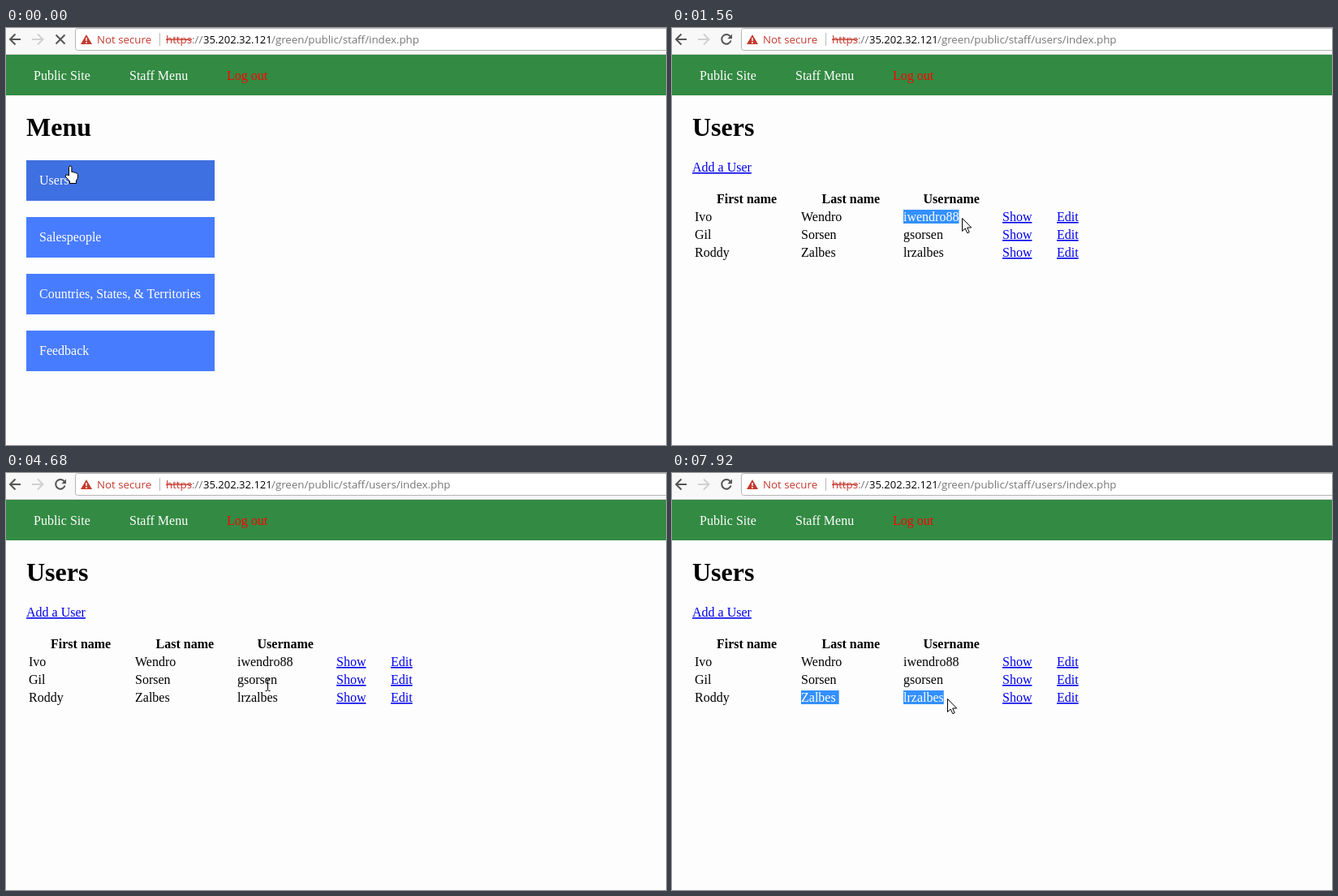
Recreate the animation shown at these times as an HTML page. Size 813 by 514 pixels, loop 8000 ms.

```html
<!DOCTYPE html>
<html lang="en">
<head>
<meta charset="utf-8">
<title>Staff users</title>
<style>
html, body { margin: 0; width: 100%; height: 100%; overflow: hidden; background: #fdfdfd; }
svg { display: block; font: 16px "Liberation Serif", serif; }
text { white-space: pre; }
.bar { font: 13.3px "Open Sans", sans-serif; }
.light { fill: #fff; }
.link { fill: #00e; text-decoration: underline; }
.line { fill: none; stroke: #555; stroke-width: 2; }
.cursor { fill: #fff; stroke: #000; }
.title { font-size: 32px; font-weight: bold; }
.head { font-weight: bold; }
</style>
</head>
<body>
<svg width="813" height="514" viewBox="0 0 813 514">
  <rect width="813" height="32" fill="#f8f8f8"/>
  <rect y="32" width="813" height="1" fill="#d4d4d4"/>
  <path d="M814 27.5H88.5q-3 0-3-3V3.5q0-3 3-3H814" fill="#fff" stroke="#b4b4b4"/>
  <path class="line" d="M18 14H6M11.5 7.5L5 14l6.5 6.5"/>
  <path class="line" d="M32 14H45M39 7.5L45.5 14l-6.5 6.5" style="stroke:#d0d0d0"/>
  <path id="stop" class="line" d="M61.5 8.5l11 11m0-11l-11 11"/>
  <g id="reload">
    <path class="line" d="M71.8 10.5A5.8 5.8 0 1 0 72.6 15.5"/>
    <path d="M74 7.5V13.2h-5.7z" fill="#555"/>
  </g>
  <path d="M99 8l7 12H92z" fill="#c5392d"/>
  <path d="M99 12v4m0 1v2" stroke="#fff" stroke-width="1.5"/>
  <rect x="189" y="6" width="1" height="16" fill="#b8b8b8"/>
  <g class="bar">
    <text x="112" y="19" fill="#c5392d">Not secure</text>
    <text x="197" y="19" fill="#c5392d" text-decoration="line-through">https</text>
    <text x="229" y="19" fill="#777">://</text>
    <text x="243" y="19" font-size="13">35.202.32.121</text>
    <text id="path" x="327" y="19" fill="#777"></text>
  </g>

  <rect y="33" width="813" height="50" fill="#338a43"/>
  <text class="light" x="34" y="64">Public Site</text>
  <text class="light" x="152" y="64">Staff Menu</text>
  <text x="272" y="64" fill="red">Log out</text>

  <g id="menu"><text class="title" x="25" y="133">Menu</text></g>
  <g id="users">
    <text class="title" x="25" y="133">Users</text>
    <text class="link" x="25" y="177">Add a User</text>
    <g class="head">
      <text x="55" y="216">First name</text>
      <text x="184.5" y="216">Last name</text>
      <text x="309.5" y="216">Username</text>
    </g>
  </g>
  <g id="marks"></g>

  <path id="hand" class="cursor" transform="translate(72 169)" d="M5.5 13V2.8a1.7 1.7 0 0 1 3.4 0V8.5q1.7-.8 2.7.6 1.8-.6 2.6.8 2.3-.3 2.3 1.7V16l-2 3V22.5h-8V20L1.2 14q-.3-2.5 2-2z"/>
  <path id="arrow" class="cursor" d="M.5.5V16.5L4.2 13l2.6 5.7 2.4-1L6.7 12h5z"/>
  <path id="beam" class="cursor" style="fill:none" d="M-3-7.5h2l1 1 1-1h2M0-6.5v13M-3 7.5h2l1-1 1 1h2"/>
</svg>
<script>
const LOOP = 8000, OPEN = 150, STEP = 140, LAST_X = 159, USER_X = 285;
const rows = [
  ["Ivo", "Wendro", "iwendro88"],
  ["Gil", "Sorsen", "gsorsen"],
  ["Roddy", "Zalbes", "lrzalbes"]
];
// Pointer moves: start and end time, place reached, row being selected
const moves = [
  [150, 1150, 283, 233],
  [1280, 1560, 357, 234, 0],
  [1700, 1990, 355, 264, 0],
  [2610, 3140, 282, 257],
  [3420, 3700, 346, 257, 1],
  [3840, 3980, 344, 263, 1],
  [4270, 5250, 285, 258],
  [5500, 5920, 350, 261, 1],
  [6200, 7030, 284, 278],
  [7310, 7920, 339, 278, 2]
];

const $ = id => document.getElementById(id);
const show = (id, on) => $(id).style.display = on ? "" : "none";
const baseline = row => 238 + 22 * row;

function add(parent, tag, attrs, content = "") {
  const el = document.createElementNS("http://www.w3.org/2000/svg", tag);
  for (const key in attrs) el.setAttribute(key, attrs[key]);
  el.textContent = content;
  return $(parent).appendChild(el);
}

["Users", "Salespeople", "Countries, States, & Territories", "Feedback"].forEach((label, i) => {
  add("menu", "rect", { x: 25, y: 163 + 70 * i, width: 232, height: 50, fill: i ? "#487cff" : "#3f70e1" });
  add("menu", "text", { x: 41, y: 193 + 70 * i, class: "light" }, label);
});

const userCells = rows.map(([first, last, user], i) => {
  const cell = (x, content, style = "") => add("users", "text", { x, y: baseline(i), class: style }, content);
  cell(28, first);
  cell(LAST_X, last);
  cell(407, "Show", "link");
  cell(474, "Edit", "link");
  return cell(USER_X, user);
});
const userEnds = userCells.map(cell => USER_X + cell.getComputedTextLength());

// The pointer advances in equal jumps during each move and rests between them
function pointer(t) {
  let x = 164, y = 183, row;
  for (const [from, to, endX, endY, marked] of moves) {
    if (t < from) break;
    const jumps = Math.round((to - from) / STEP);
    const done = Math.min(jumps, Math.floor((t - from) / (to - from) * jumps + 0.04));
    const u = (done + 1) / (jumps + 1);
    x += (endX - x) * u;
    y += (endY - y) * u;
    row = marked;
  }
  return { x: Math.round(x), y: Math.round(y), row };
}

function mark(x, row, content) {
  const box = add("marks", "rect", { x, y: baseline(row) - 14, height: 17, fill: "#3390ff" });
  const text = add("marks", "text", { x, y: baseline(row), class: "light" }, content);
  box.setAttribute("width", text.getComputedTextLength());
}

function select(row, x) {
  $("marks").textContent = "";
  if (row === undefined) return;
  const [, last, user] = rows[row];
  let n = 0;
  while (n < user.length && userCells[row].getEndPositionOfChar(n).x < x) n++;
  if (n) mark(USER_X, row, user.slice(0, n));
  if (row && x > userEnds[row]) mark(LAST_X, row, last + " ");
}

function draw(t) {
  const open = t >= OPEN, { x, y, row } = pointer(t);
  const overText = userEnds.some((end, i) => x >= USER_X && x <= end && Math.abs(y - baseline(i) + 5.5) <= 8.5);
  for (const id of ["menu", "stop", "hand"]) show(id, !open);
  for (const id of ["users", "reload", "marks"]) show(id, open);
  show("arrow", open && !overText);
  show("beam", open && overText);
  $("arrow").setAttribute("transform", `translate(${x} ${y})`);
  $("beam").setAttribute("transform", `translate(${x + 0.5} ${y})`);
  $("path").textContent = `/green/public/staff/${open ? "users/" : ""}index.php`;
  select(row, x);
}

const start = performance.now();
function tick() {
  draw((performance.now() - start) % LOOP);
  requestAnimationFrame(tick);
}
tick();
</script>
</body>
</html>
```
